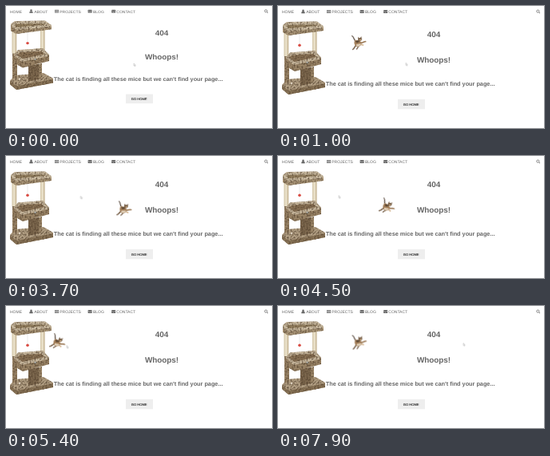
Write an HTML page that moves like this. It is 333 by 153 pixels and loops after 8000 ms.

```html
<!DOCTYPE html>
<html lang="en">
<head>
<meta charset="utf-8">
<title>404</title>
<style>
  html, body { margin: 0; width: 100%; height: 100%; overflow: hidden; background: #fff; }
  svg { display: block; width: 333px; height: 153px; }
  text { font-family: "Liberation Sans", Arial, sans-serif; text-rendering: geometricPrecision; }
  .nav { fill: #666; font-size: 5px; }
  .title { fill: #666; font-weight: 700; font-size: 9.9px; text-anchor: middle; }
  .lead { font-size: 7.29px; }
  .button { fill: #222; stroke: #222; stroke-width: .12px; font-size: 4.1px; text-anchor: middle; }

  .page { animation: settle 8s step-end infinite; }
  .cat { animation: chase 8s linear infinite, appear 8s step-end infinite; }
  .pose { animation: pose 8s step-end infinite; }
  .cursor { animation: point 8s linear infinite; }

  @keyframes settle {
    0% { transform: scaleY(.945); }
    3.75%, 100% { transform: none; }
  }
  @keyframes appear {
    0% { opacity: 0; }
    3.75%, 100% { opacity: 1; }
  }
  @keyframes chase {
    0%, 3.75% { transform: translate(10px, 6px); }
    12.5% { transform: translate(101px, 46px); }
    17.5% { transform: translate(148px, 67px); }
    50% { transform: translate(148px, 67px); animation-timing-function: ease-in; }
    56.25% { transform: translate(137px, 64px); }
    60% { transform: translate(108px, 56px); }
    67.5%, 95% { transform: translate(65px, 46px); }
    98.75% { transform: translate(101.5px, 45.5px); }
    100% { transform: translate(113px, 45px); }
  }
  @keyframes pose {
    0% { transform: none; }
    17.5% { transform: rotate(12deg); }
    50% { transform: rotate(24deg); }
    95%, 100% { transform: none; }
  }
  @keyframes point {
    0%, 1.24% { transform: translate(160px, 72px); }
    1.25%, 37.5% { transform: translate(160px, 71.3px); }
    40%, 41.25% { transform: translate(152px, 61px); }
    43.75%, 45% { transform: translate(111px, 51px); }
    47.5%, 81.25% { transform: translate(76px, 49.5px); }
    83.75% { transform: translate(138px, 42px); }
    86.25% { transform: translate(166px, 40px); }
    91.25%, 100% { transform: translate(232px, 46.5px); }
  }
</style>
</head>
<body>
<svg viewBox="0 0 333 153">
  <defs>
    <filter id="carpet" x="0" y="0" width="1" height="1" color-interpolation-filters="sRGB">
      <feTurbulence type="fractalNoise" baseFrequency=".5" numOctaves="2" seed="4"/>
      <feColorMatrix values="0 0 0 0 .3  0 0 0 0 .23  0 0 0 0 .16  2 0 0 0 -.8"/>
      <feComposite in2="SourceGraphic" operator="in" result="fleck"/>
      <feMerge><feMergeNode in="SourceGraphic"/><feMergeNode in="fleck"/></feMerge>
    </filter>
    <linearGradient id="post">
      <stop offset="0" stop-color="#cfc1a2"/>
      <stop offset=".45" stop-color="#eee6d0"/>
      <stop offset="1" stop-color="#c0ae8c"/>
    </linearGradient>
    <g id="mail">
      <rect width="5" height="4" rx=".5"/>
      <path d="M.2 1.1 2.5 2.7 4.8 1.1" fill="none" stroke="#fff" stroke-width=".4"/>
    </g>
  </defs>

  <g class="page">
    <g class="nav">
      <text x="5" y="9">HOME</text>
      <circle cx="31.5" cy="5.9" r="1.3"/>
      <path d="M29.3 9.2c0-2.3.8-2.3 2.2-2 1.4-.3 2.2-.3 2.2 2z"/>
      <text x="35.2" y="9">ABOUT</text>
      <rect x="61" y="4.9" width="5" height="4.2" rx=".4"/>
      <path d="M61 6.3h5M61 7.7h5M62.7 4.9v4.2M64.4 4.9v4.2" stroke="#fff" stroke-width=".35"/>
      <text x="67.2" y="9">PROJECTS</text>
      <use href="#mail" x="102.6" y="5.1"/>
      <text x="109" y="9">BLOG</text>
      <use href="#mail" x="132.1" y="5.1"/>
      <text x="138.3" y="9">CONTACT</text>
      <g fill="none" stroke="#666">
        <circle cx="325.4" cy="6.6" r="1.6" stroke-width=".8"/>
        <path d="M326.7 7.9 328 9.2" stroke-width="1"/>
      </g>
    </g>

    <!-- cat tower -->
    <g stroke-linejoin="round">
      <g filter="url(#carpet)">
        <path d="M5 99 11 92 47 89 59 96V102L13 111 5 104Z" fill="#b5a286"/>
        <path d="M5 100 13 106 59 97V102L13 111 5 104Z" fill="#8a7558"/>
        <path d="M8 60H14V95L8 97Z" fill="#9b8567"/>
        <path d="M28 79 41 77V97L28 100Z" fill="#7d684e"/>
        <path d="M41 77 45 76V95L41 97Z" fill="#a08b6d"/>
      </g>
      <g fill="url(#post)">
        <rect x="7.5" y="32" width="5.8" height="31"/>
        <rect x="43" y="31" width="5.6" height="28"/>
      </g>
      <g filter="url(#carpet)">
        <path d="M10 65 15 59 46 56 54 65V73L21 82 11 76Z" fill="#9c8668"/>
        <path d="M12 65 16 60 45 58 52 65 20 72Z" fill="#8b7356" stroke="#cbbba1" stroke-width="3.5"/>
      </g>
      <g filter="url(#carpet)">
        <path d="M6 24 11 20 49 19.5 57 26V31L13 37 6 33Z" fill="#a99577"/>
        <path d="M8 25 12 22 48 21.5 55 26 13 30Z" fill="#94805f" stroke="#cfc0a6" stroke-width="3.5"/>
      </g>
      <path d="M27 34V48" stroke="#ccc" stroke-width=".4"/>
      <circle cx="27" cy="49.3" r="1.8" fill="#d94b43"/>
      <ellipse cx="36.8" cy="71" rx="1.7" ry="1.2" fill="#69665f"/>
      <circle cx="36.4" cy="70.6" r=".8" fill="#e9e6df"/>
      <circle cx="17" cy="97" r=".9" fill="#eee6d8"/>
    </g>

    <g class="title">
      <text x="195" y="39.4">404</text>
      <text x="195" y="71.1">Whoops!</text>
      <text class="lead" x="165.6" y="99.8">The cat is finding all these mice but we can't find your page...</text>
    </g>
    <rect x="150" y="117" width="34" height="12.3" fill="#eee"/>
    <text class="button" x="166.7" y="124.6">GO HOME</text>
  </g>

  <g class="cat">
    <g class="pose" fill="none" stroke-linecap="round" stroke-linejoin="round">
      <path d="M-8.5-8.5C-6-8-6.5-4-4-2" stroke="#55463a" stroke-width="1.2"/>
      <path d="M-3 3C-5 4-5 7-7.5 8.5M0 4-2.5 8" stroke="#6f563e" stroke-width="1.4"/>
      <path d="M2 0C4 1 6-1.5 8.5-1.5" stroke="#97734f" stroke-width="1.7"/>
      <path d="M2 2 5.5 3" stroke="#d3b48e" stroke-width="1.4"/>
      <path d="M-5-3C-2-4 3-2 3.5 1 3 5-2 6-4 4-6 2-6-1-5-3Z" fill="#a17c56"/>
      <path d="M-3 2C0 2 1 1 3 1.5 2 4.5-1 5.5-3 4Z" fill="#e0cfb8"/>
      <path d="M-4.5-1.5-1.5-3 1-1.5-2 .2Z" fill="#5b4734"/>
      <path d="M-1-7.5.4-5.8 2.4-6.6 3.2-8.3 3.8-4.5C3.5-1.5.5-1-.8-3Z" fill="#6d543b"/>
      <path d="M.6-4.3 2.8-4.6 2.6-2.6 1.2-2.4Z" fill="#d9b78e"/>
    </g>
  </g>

  <path class="cursor" d="M0 0V3.2L.8 2.6 1.3 3.6 1.8 3.4 1.4 2.4 2.3 2.3Z" fill="#fff" stroke="#999" stroke-width=".4"/>
</svg>
</body>
</html>
```
